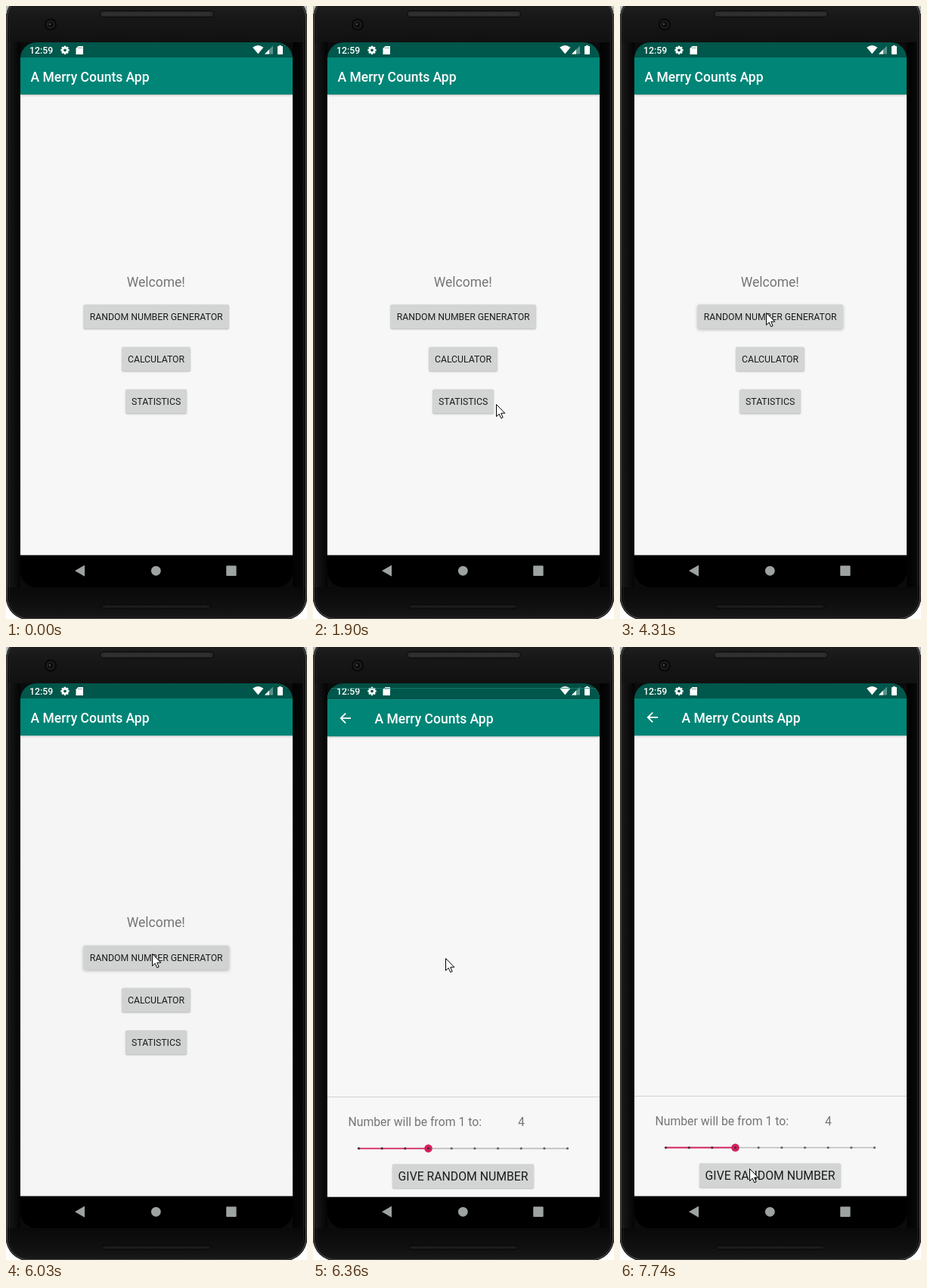
An HTML page with a canvas that plays this animation: 398 by 810 pixels, repeating every 8000 ms.

```html
<!DOCTYPE html>
<html lang="en">
<head>
<meta charset="utf-8">
<title>Number app demo</title>
<style>
  html, body { margin: 0; width: 100%; height: 100%; overflow: hidden; background: #fff; }
  canvas { display: block; width: 398px; height: 810px; }
</style>
</head>
<body>
<canvas id="stage"></canvas>
<script>
const W = 398, H = 810, LOOP = 8000;
const SCREEN = { x: 19, y: 48, w: 360, h: 720 };
const NAV_TOP = 725.6, BAR_TOP = 68, BAR_BOTTOM = 117;
const OPEN_AT = 6020, OPEN_TIME = 450;
const TITLE = 'A Merry Counts App';

// Pointer tip: time, x, y
const POINTER = [
  [1060, 303, 800], [1300, 295, 722], [1550, 277, 640], [1850, 248, 542],
  [1900, 242, 526], [2100, 222, 470], [2360, 193, 395], [2540, 193, 395],
  [2640, 193, 405], [6030, 193, 405], [6150, 185, 407], [6360, 175, 411],
  [6600, 148, 420], [6820, 118, 444], [7060, 93, 510], [7240, 91, 560],
  [7440, 116, 625], [7640, 166, 677], [7740, 171, 689]
];

const canvas = document.getElementById('stage');
const c = canvas.getContext('2d');
const dpr = window.devicePixelRatio || 1;
canvas.width = W * dpr;
canvas.height = H * dpr;

const clamp = v => Math.max(0, Math.min(1, v));
const mix = (a, b, k) => a + (b - a) * k;

function cubic(a, b, d, e, u) {
  const v = 1 - u;
  return a * v * v * v + 3 * b * u * v * v + 3 * d * u * u * v + e * u * u * u;
}

function curve(x, xs, ys) {
  let lo = 0, hi = 1;
  for (let i = 0; i < 24; i++) {
    const mid = (lo + hi) / 2;
    if (cubic(...xs, mid) < x) lo = mid; else hi = mid;
  }
  return cubic(...ys, lo);
}

const easeSlide = x => curve(x, [0, 0.4, 0.2, 1], [0, 0, 1, 1]);
const easeReveal = x => x < 1 / 6
  ? curve(x, [0, 0.05, 0.1333, 1 / 6], [0, 0, 0.06, 0.4])
  : curve(x, [1 / 6, 0.2083, 0.25, 1], [0.4, 0.82, 1, 1]);

function rect(x, y, w, h, fill) {
  c.fillStyle = fill;
  c.fillRect(x, y, w, h);
}

function rounded(x, y, w, h, r) {
  c.beginPath();
  c.roundRect(x, y, w, h, r);
}

function disc(x, y, r, fill) {
  c.beginPath();
  c.arc(x, y, r, 0, Math.PI * 2);
  c.fillStyle = fill;
  c.fill();
}

function poly(points, fill) {
  c.beginPath();
  points.forEach(([x, y]) => c.lineTo(x, y));
  c.closePath();
  c.fillStyle = fill;
  c.fill();
}

function line(x1, y1, x2, y2, color, width) {
  c.beginPath();
  c.moveTo(x1, y1);
  c.lineTo(x2, y2);
  c.strokeStyle = color;
  c.lineWidth = width;
  c.stroke();
}

function text(str, x, y, size, color, weight = 400, align = 'left') {
  c.font = `${weight} ${size}px Roboto, sans-serif`;
  c.textAlign = align;
  c.fillStyle = color;
  c.fillText(str, x, y);
}

function gradient(x1, y1, x2, y2, stops) {
  const g = c.createLinearGradient(x1, y1, x2, y2);
  stops.forEach(([at, color]) => g.addColorStop(at, color));
  return g;
}

function withShadow(blur, dy, alpha, draw) {
  c.save();
  c.shadowColor = `rgba(0,0,0,${alpha})`;
  c.shadowBlur = blur * dpr;
  c.shadowOffsetY = dy * dpr;
  draw();
  c.restore();
}

function speaker(x, y, w, h, fill, dots) {
  rounded(x, y, w, h, h / 2);
  c.fillStyle = fill;
  c.fill();
  c.strokeStyle = '#070707';
  c.lineWidth = 1;
  c.stroke();
  for (let i = x + 5; i < x + w - 4; i += 3) rect(i, y + h / 2 - 1, 1.5, 2, dots);
}

function phone() {
  rect(0, 0, W, H, '#fff');
  rect(0, 0, W, 8, '#b8bab9');
  rounded(0, -14, W, 825, 30);
  c.fillStyle = '#0b0b0b';
  c.fill();
  c.save();
  c.clip();
  rect(0, 0, W, 48, gradient(0, 0, 0, 48, [[0, '#1e1e1e'], [0.35, '#171717'], [1, '#111']]));
  rect(0, 48, 19, 720, gradient(0, 0, 19, 0, [[0, '#1a1a1a'], [0.5, '#101010'], [1, '#040404']]));
  rect(379, 48, 19, 720, gradient(379, 0, 398, 0, [[0, '#020202'], [0.6, '#060606'], [1, '#181818']]));
  rect(0, 768, W, 42, gradient(0, 768, 0, 810, [[0, '#090909'], [0.6, '#101010'], [1, '#181818']]));
  c.restore();
  c.lineWidth = 1;
  [[0.5, '#2c2c2c'], [1.5, '#4c4c4c'], [4.5, '#1a1a1a']].forEach(([d, color]) => {
    rounded(d, d - 14, W - 2 * d, 825 - 2 * d, 30 - d);
    c.strokeStyle = color;
    c.stroke();
  });
  speaker(124.5, 6.5, 150, 8, '#2b2b2b', '#3a3a3a');
  speaker(126.5, 791, 144, 5, '#181818', '#242424');
  disc(59, 24.5, 8, '#080808');
  disc(59, 24.5, 6, '#1a1c1c');
  disc(59, 24.5, 3.2, '#0a0c0c');
  disc(58, 24, 1.1, '#606666');
}

function statusIcons() {
  text('12:59', 31, 62.7, 12.3, '#fff', 500);
  // Gear
  for (let i = 0; i < 8; i++) {
    c.save();
    c.translate(78, 58.3);
    c.rotate(i * Math.PI / 4);
    rect(-1.3, -5.6, 2.6, 3, '#fff');
    c.restore();
  }
  c.beginPath();
  c.arc(78, 58.3, 3.1, 0, Math.PI * 2);
  c.strokeStyle = '#fff';
  c.lineWidth = 2.4;
  c.stroke();
  // Memory card
  poly([[95.5, 53], [102, 53], [102, 64], [92.5, 64], [92.5, 56]], '#fff');
  [95.2, 97.4, 99.6].forEach(x => rect(x, 54.3, 1, 2.2, 'rgba(0,87,75,.6)'));
  // Wi-Fi, signal, battery
  c.beginPath();
  c.moveTo(333.3, 63.3);
  c.lineTo(326.2, 54.7);
  c.quadraticCurveTo(333.3, 49.5, 340.4, 54.7);
  c.fillStyle = '#fff';
  c.fill();
  poly([[353, 52.5], [353, 63.5], [342, 63.5]], 'rgba(255,255,255,.35)');
  poly([[348, 57.5], [348, 63.5], [342, 63.5]], '#fff');
  rect(361, 52, 3, 2, '#fff');
  rounded(359, 53, 7, 11, 0.8);
  c.fillStyle = '#fff';
  c.fill();
}

function navIcons() {
  const color = '#9da3a0';
  poly([[91, 746.3], [104, 738.8], [104, 753.8]], color);
  disc(198.3, 746.3, 6.4, color);
  rounded(291.2, 739.6, 13.4, 13.4, 1);
  c.fillStyle = color;
  c.fill();
}

function button(label, x, y, w, size, lift = 0) {
  const h = 31.8;
  withShadow(2 + lift, 1 + lift / 4, 0.26, () => {
    rounded(x, y, w, h, 1.8);
    c.fillStyle = '#d3d4d4';
    c.fill();
  });
  text(label, x + w / 2, y + h / 2 + size * 0.36, size, '#1c1c1c', 400, 'center');
}

function appBar(titleX) {
  rect(SCREEN.x, BAR_TOP, SCREEN.w, NAV_TOP - BAR_TOP, '#f7f7f7');
  withShadow(2.5, 1, 0.25, () => rect(SCREEN.x, BAR_TOP, SCREEN.w, BAR_BOTTOM - BAR_TOP, '#008577'));
  text(TITLE, titleX, 99.8, 17.5, '#fff', 500);
}

function ripple(t) {
  const age = t - 3890;
  if (age < 0 || age >= 420) return;
  const fade = age < 200 ? 1 : 1 - (age - 200) / 220;
  c.save();
  rounded(102.5, 394.5, 192.5, 32, 1.8);
  c.clip();
  rect(102, 394, 194, 33, `rgba(0,0,0,${0.06 * fade})`);
  disc(193, 405, 10 + 100 * clamp(age / 225), `rgba(0,0,0,${0.07 * fade})`);
  c.restore();
}

function homePage(t) {
  appBar(32.5);
  text('Welcome!', 198.3, 370.5, 17.5, '#757575', 400, 'center');
  button('RANDOM NUMBER GENERATOR', 102.5, 394.5, 192.4, 12.25, t >= 3890 ? 2 : 0);
  button('CALCULATOR', 153.2, 450.5, 90.6, 12.25);
  button('STATISTICS', 158.2, 506.5, 80.8, 12.25);
  ripple(t);
}

function slider(y) {
  const start = 60.5, gap = 30.67, value = 3, thumb = start + value * gap;
  line(thumb, y, start + 9 * gap, y, '#bdbdbd', 1.6);
  line(start, y, thumb, y, '#d2205f', 1.8);
  disc(thumb, y, 5.3, '#d2205f');
  for (let i = 0; i < 10; i++) disc(start + i * gap, y, 1.6, i <= value ? '#4a2a36' : '#666');
}

function randomPage() {
  appBar(81.5);
  line(36.8, 93, 50, 93, '#fff', 1.8);
  c.beginPath();
  c.moveTo(43.2, 86.6);
  c.lineTo(36.8, 93);
  c.lineTo(43.2, 99.4);
  c.stroke();
  line(SCREEN.x, 593.5, 379, 593.5, '#d2d2d2', 1);
  text('Number will be from 1 to:', 46.5, 631.5, 15.77, '#757575');
  text('4', 271, 631.5, 15.77, '#757575');
  slider(661.5);
  button('GIVE RANDOM NUMBER', 105, 682.2, 187, 15.77);
}

function screen(t) {
  const open = t >= 6030;
  const progress = clamp((t - OPEN_AT) / OPEN_TIME);
  const slide = easeSlide(progress);
  const reveal = easeReveal(progress);
  const shade = `rgba(0,0,0,${0.1 * clamp((t - OPEN_AT) / 120)})`;
  const { x, y, w, h } = SCREEN;

  c.save();
  rounded(x, y, w, h, 21);
  c.clip();
  rect(x, y, w, h, '#000');
  navIcons();
  rect(x, y, w, 23, '#00574b');
  if (open && progress < 1) rect(x, y, w, 23, shade);
  statusIcons();

  if (progress < 1) {
    c.save();
    c.translate(0, -0.02 * h * slide);
    homePage(t);
    if (open) rect(x, BAR_TOP, w, NAV_TOP - BAR_TOP, shade);
    c.restore();
  }
  if (open) {
    const offset = 0.041 * h * (1 - slide);
    const top = y + offset + 0.959 * h * (1 - reveal);
    c.save();
    c.beginPath();
    c.rect(x, top, w, y + h - top);
    c.clip();
    rect(x, y, w, BAR_TOP + offset - y, '#00574b');
    statusIcons();
    c.translate(0, offset);
    randomPage();
    c.restore();
  }
  c.restore();
}

function pointer(t) {
  if (t < POINTER[0][0]) return;
  let [, x, y] = POINTER[POINTER.length - 1];
  const next = POINTER.findIndex(p => p[0] > t);
  if (next > 0) {
    const a = POINTER[next - 1], b = POINTER[next];
    const k = (t - a[0]) / (b[0] - a[0]);
    x = mix(a[1], b[1], k);
    y = mix(a[2], b[2], k);
  }
  c.save();
  c.translate(Math.round(x) + 0.5, Math.round(y) + 0.5);
  poly([[0, 0], [0, 16], [3.7, 12.6], [6.2, 18.2], [8.6, 17.2], [6.2, 11.6], [11.3, 11.6]], '#fff');
  c.strokeStyle = '#000';
  c.lineWidth = 1;
  c.stroke();
  c.restore();
}

function frame() {
  const t = performance.now() % LOOP;
  c.setTransform(dpr, 0, 0, dpr, 0, 0);
  phone();
  screen(t);
  pointer(t);
  requestAnimationFrame(frame);
}

frame();
</script>
</body>
</html>
```
